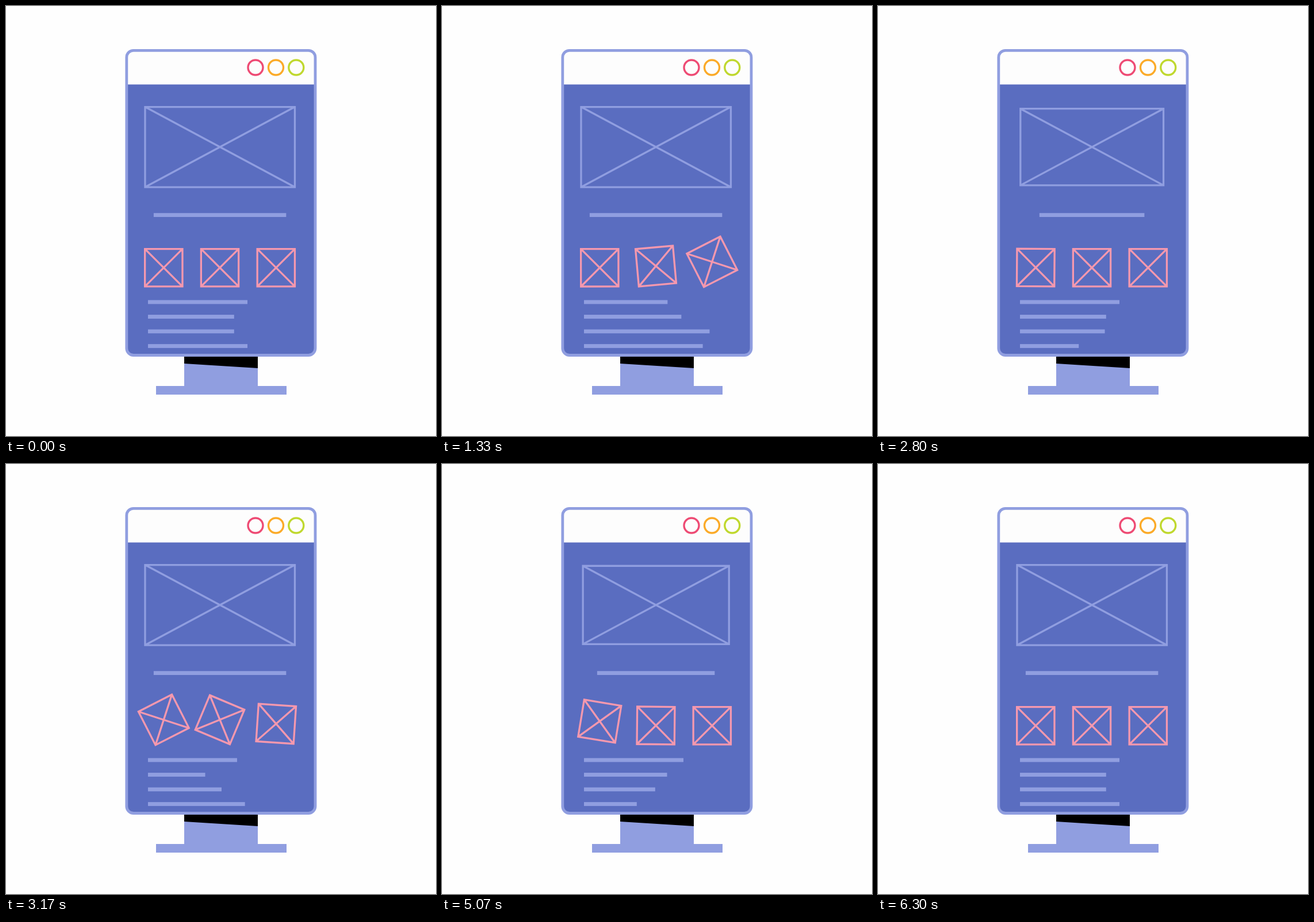
An HTML page with a canvas that plays this animation: 748x748 px, repeating every 6360 ms.

```html
<!DOCTYPE html>
<html lang="en">
<head>
<meta charset="utf-8">
<title>Wireframe screen</title>
<style>
html, body { margin: 0; width: 100%; height: 100%; overflow: hidden; background: #fefefe; }
canvas { display: block; }
</style>
</head>
<body>
<canvas id="stage" width="748" height="748"></canvas>
<script>
const ctx = document.getElementById('stage').getContext('2d');
const CYCLE = 2120;
const STAGGER = 140;
const BODY = '#5a6dc0', LIGHT = '#909ee0', PINK = '#f598ae';

const DOTS = [[434, '#ee4b74'], [469.5, '#fbab29'], [504.8, '#c0d82f']];
const BOXES = [274.3, 372, 469.8];
// y, rest, shortest and longest width of each text line
const LINES = [
  [515, 173, 142.5, 183],
  [540.5, 149.8, 99.5, 205],
  [566, 149.8, 121, 219.5],
  [591.5, 173, 91.5, 208]
];

// Cubic ease in and out between two times
function ease(t, from, to) {
  const p = Math.min(1, Math.max(0, (t - from) / (to - from)));
  return p < 0.5 ? 4 * p ** 3 : 1 - 4 * (1 - p) ** 3;
}

// Rises to 1 at the peak and falls back to 0
function pulse(t, from, peak, to) {
  return ease(t, from, peak) - ease(t, peak, to);
}

function fill(color, x, y, w, h) {
  ctx.fillStyle = color;
  ctx.fillRect(x, y, w, h);
}

function crossedBox(x, y, w, h, color, angle = 0) {
  ctx.save();
  ctx.translate(x, y);
  ctx.rotate(angle);
  ctx.strokeStyle = color;
  ctx.lineWidth = 3.3;
  ctx.beginPath();
  ctx.rect(-w / 2, -h / 2, w, h);
  ctx.moveTo(-w / 2, -h / 2);
  ctx.lineTo(w / 2, h / 2);
  ctx.moveTo(w / 2, -h / 2);
  ctx.lineTo(-w / 2, h / 2);
  ctx.stroke();
  ctx.restore();
}

function drawStand() {
  fill(LIGHT, 310, 606, 128, 58);
  fill(LIGHT, 261, 661, 227, 15);
  ctx.fillStyle = '#000';
  ctx.beginPath();
  ctx.moveTo(310, 606);
  ctx.lineTo(438, 606);
  ctx.lineTo(438, 630);
  ctx.lineTo(310, 622);
  ctx.fill();
}

function drawScreen() {
  ctx.beginPath();
  ctx.roundRect(209.8, 77.3, 328.2, 530.2, 12);
  ctx.save();
  ctx.clip();
  fill('#fdfdfd', 207, 75, 334, 62);
  fill(BODY, 207, 136.5, 334, 475);
  ctx.restore();
  ctx.strokeStyle = LIGHT;
  ctx.lineWidth = 4.8;
  ctx.stroke();

  ctx.lineWidth = 3.4;
  for (const [x, color] of DOTS) {
    ctx.strokeStyle = color;
    ctx.beginPath();
    ctx.arc(x, 107, 13, 0, Math.PI * 2);
    ctx.stroke();
  }
}

function drawHeader(t) {
  const dip = pulse(t, 450, 700, 970);
  const scale = 1 - 0.045 * dip;
  crossedBox(372.2, 245.3, 260.5 * scale, 139.5 * scale, LIGHT);
  const w = 230.5 * (1 - 0.208 * dip);
  fill(LIGHT, 372.1 - w / 2, 360.2, w, 6.8);
}

function drawBoxes(t) {
  BOXES.forEach((x, i) => {
    const local = t - i * STAGGER;
    const lift = 10.7 * pulse(local, 617, 977, 1337);
    const angle = Math.PI / 2 * ease(local, 600, 1380);
    crossedBox(x, 455.3 - lift, 65.3, 65.3, PINK, angle);
  });
}

function drawLines(t) {
  LINES.forEach(([y, rest, short, long], i) => {
    const local = t - (LINES.length - 1 - i) * STAGGER;
    const w = rest
      + (short - rest) * ease(local, 450, 790)
      + (long - short) * ease(local, 790, 1255)
      + (rest - long) * ease(local, 1255, 1610);
    fill(LIGHT, 247, y - 3.4, w, 6.8);
  });
}

const start = performance.now();

function frame(now) {
  const t = Math.max(0, now - start) % CYCLE;
  fill('#fefefe', 0, 0, 748, 748);
  drawStand();
  drawScreen();
  drawHeader(t);
  drawBoxes(t);
  drawLines(t);
  requestAnimationFrame(frame);
}
frame(start);
</script>
</body>
</html>
```
